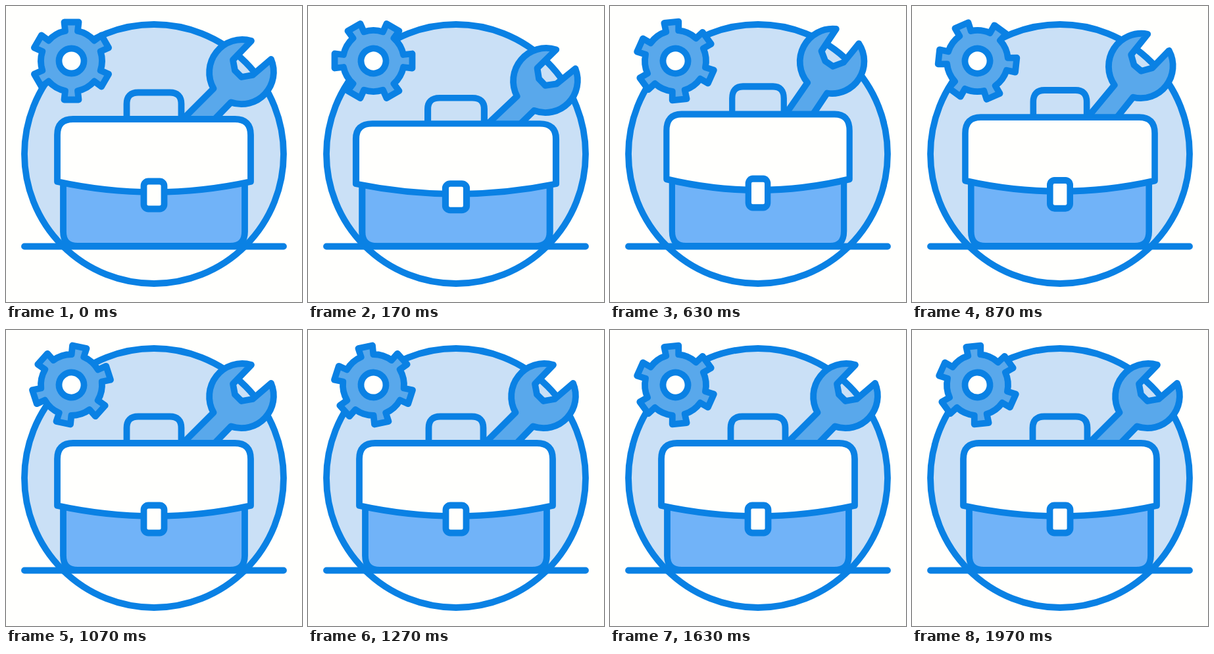
These frames come from a looping animation (450 px wide and 450 px high, 2.01 s). An HTML page:

```html
<!DOCTYPE html>
<html lang="en">
<head>
<meta charset="utf-8">
<title>Toolbox</title>
<style>
  html, body { margin: 0; width: 100%; height: 100%; overflow: hidden; background: #fffffd; }
  svg { display: block; width: 100%; height: 100%; }
  .line { stroke: #0a81e4; stroke-width: 9.8; stroke-linecap: round; stroke-linejoin: round; fill: none; }
  .pale { fill: #cae0f6; }
  .mid { fill: #71b3f8; }
  .deep { fill: #59a8eb; }
  .white { fill: #fffffd; }
</style>
</head>
<body>
<svg viewBox="0 0 450 450">
  <path class="pale" d="M86.4 365A197 197 0 1 1 363.6 365Z"/>
  <circle class="line" cx="225" cy="225" r="197"/>

  <g id="wrench">
    <path class="line deep" d="M248 193L315.5 125.5A50 50 0 0 1 373 53L345 82L348 98L358 108L375 105L403 81A49 49 0 0 1 342 146.5L296 194Z"/>
  </g>

  <g id="bag" class="line">
    <path d="M183.5 172V149Q183.5 131.5 201 131.5H249Q266.5 131.5 266.5 149V172"/>
    <path class="mid" d="M87 265V343Q87 365 109 365H341Q363 365 363 343V265Z"/>
    <path class="white" d="M78 267V196Q78 172 102 172H348Q372 172 372 196V267Q225 299 78 267Z"/>
    <rect class="white" x="209.5" y="266.5" width="31" height="42" rx="7"/>
  </g>

  <path class="line" d="M28 365.5H422"/>

  <g id="gear" class="line">
    <path id="cog" class="deep"/>
    <circle class="white" r="19"/>
  </g>
</svg>
<script>
const LOOP = 2010, FRAMES = 60, STEP = 100 / 3;
const byId = id => document.getElementById(id);
const wrench = byId('wrench'), bag = byId('bag'), gear = byId('gear');

// Bag pose: frame, scale x, scale y
const bagPoses = [[0, 1, 1], [10, 1.068, 0.929], [20, 0.943, 1.042], [30, 1, 1], [FRAMES, 1, 1]];
// Wrench pose: frame, angle, drop
const wrenchPoses = [[0, 0, 0], [10, 3.3, 19.5], [20, -10.7, 1], [32, 0, 0], [FRAMES, 0, 0]];

function cogPath(teeth, body, tip) {
  const rootHalf = 9.5, tipHalf = 11;
  const root = -Math.sqrt(body * body - rootHalf * rootHalf);
  let d = '';
  for (let i = 0; i < teeth; i++) {
    const a = i * 2 * Math.PI / teeth;
    const point = (x, y) =>
      `${(x * Math.cos(a) - y * Math.sin(a)).toFixed(2)} ${(x * Math.sin(a) + y * Math.cos(a)).toFixed(2)}`;
    d += `${i ? `A${body} ${body} 0 0 1 ` : 'M'}${point(-rootHalf, root)}` +
      `L${point(-tipHalf, -tip)}L${point(tipHalf, -tip)}L${point(rootHalf, root)}`;
  }
  return `${d}A${body} ${body} 0 0 1 ${d.slice(1, d.indexOf('L'))}Z`;
}

function poseAt(poses, frame) {
  const next = poses.findIndex(p => p[0] > frame);
  const from = poses[next - 1], to = poses[next];
  const u = (frame - from[0]) / (to[0] - from[0]);
  const eased = u * u * (3 - 2 * u);
  return from.map((v, i) => v + (to[i] - v) * eased);
}

function render(time) {
  const frame = Math.min(FRAMES - 1, Math.floor((time % LOOP + 4) / STEP));
  const [, sx, sy] = poseAt(bagPoses, frame);
  const [, angle, drop] = poseAt(wrenchPoses, frame);
  gear.setAttribute('transform', `translate(99.5 83.5) rotate(${frame * 360 / FRAMES})`);
  bag.setAttribute('transform', `translate(225 365) scale(${sx} ${sy}) translate(-225 -365)`);
  wrench.setAttribute('transform', `translate(0 ${drop}) rotate(${angle} 250 205)`);
}

byId('cog').setAttribute('d', cogPath(6, 46.5, 59));
const start = performance.now();
function tick() {
  render(performance.now() - start);
  requestAnimationFrame(tick);
}
tick();
</script>
</body>
</html>
```
